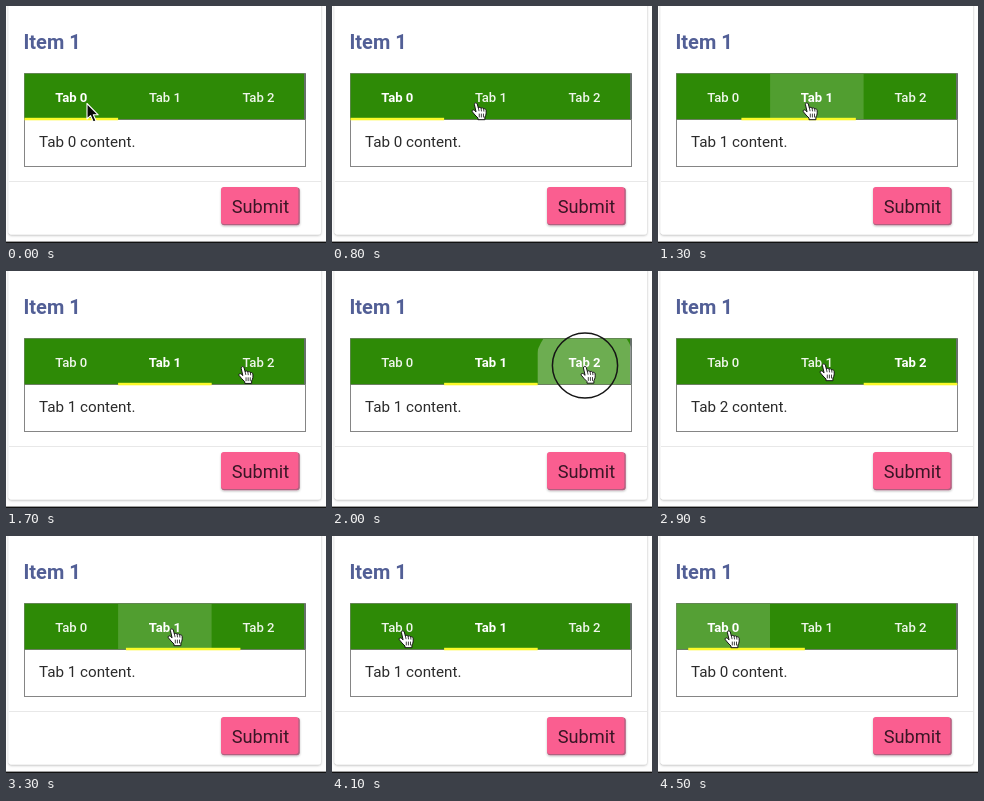
These frames come from a looping animation (320x237 px, 4600 ms). An HTML page:

```html
<!DOCTYPE html>
<html lang="en">
<head>
<meta charset="utf-8">
<title>Tabs</title>
<style>
html, body { margin: 0; width: 100%; height: 100%; overflow: hidden; background: #fdfdfd; }
svg { display: block; width: 100vw; height: 100vh; }
text { font-family: Roboto, "Open Sans", sans-serif; }
.tab { font-size: 13.1px; font-weight: 500; fill: #eef6ea; text-anchor: middle; }
.tab.active { font-weight: 700; fill: #fff; }
</style>
</head>
<body>
<svg viewBox="0 0 320 237">
  <defs>
    <filter id="shadow" x="-10%" y="-10%" width="120%" height="130%">
      <feDropShadow dx="0" dy="1" stdDeviation="1.2" flood-opacity=".27"/>
    </filter>
    <clipPath id="tabClip"><rect id="clipRect" y="68" width="93.5" height="45"/></clipPath>
  </defs>

  <rect width="320" height="237" fill="#fdfdfd"/>
  <rect x="2.5" y="-8" width="312.5" height="236.5" rx="3" fill="#fff" filter="url(#shadow)"/>
  <path d="M3 175.5H315" stroke="#e8e8e8"/>
  <rect y="235.6" width="320" height="2" fill="#111"/>

  <text x="17.5" y="43" font-size="20" font-weight="700" fill="#525f96">Item 1</text>

  <rect x="18.5" y="67.5" width="281" height="93" fill="#fff" stroke="#858585"/>
  <rect x="18.5" y="67.6" width="280" height="45.9" fill="#2e8a06"/>
  <path d="M19 113.5H299" stroke="#6b8060"/>
  <path d="M299 68V113" stroke="#66706a" stroke-width="2"/>
  <g clip-path="url(#tabClip)"><circle id="ripple" fill="#fff"/></g>
  <rect id="ink" y="111.8" height="2.5" fill="#fbf92a"/>
  <g id="tabs"></g>
  <text id="content" x="33" y="141" font-size="15.2" fill="#2b2b2b"></text>

  <rect x="215.2" y="181.4" width="78.6" height="37.8" rx="3" fill="#b0617f" filter="url(#shadow)"/>
  <rect x="215" y="181" width="77.4" height="37" rx="3" fill="#fa5e90"/>
  <text x="225.8" y="207" font-size="18.2" fill="#3a1626">Submit</text>

  <circle id="ring" r="32.6" fill="none" stroke="#151515" stroke-width="1.5"/>
  <path id="arrow" d="M0 .5V16L3.6 12.7L6.3 18.9L9 17.7L6.3 11.8H11.2Z"
        fill="#080808" stroke="#fff" stroke-width="1.1" stroke-linejoin="round"/>
  <g id="hand" stroke="#111" stroke-width="1" stroke-linejoin="round" stroke-linecap="round">
    <path fill="#fff" d="M-1.6 1.2C-1.8-.5 .9-.7 1.3 1L2.4 5C3 3.9 4.9 4.2 5.1 5.3C6 4.4 7.5 4.9 7.7 6C8.8 5.4 10 6.1 10.1 7.3C10.4 10 10.2 12.1 8.9 14V16.7H2V15C.1 13.3-2.1 10.8-3.7 8.7C-4.4 7.2-2.7 6.3-1.5 7.4L-.2 8.6Z"/>
    <path fill="none" stroke-width=".8" d="M2.4 5L3 7.8M5.1 5.3L5.5 8M7.7 6L7.9 8.2M3.3 11V14M5.4 11V14M7.5 11V14"/>
  </g>
</svg>
<script>
const LOOP = 4600, STEP = 100;
const TAB_X = 18.5, TAB_W = 93.6, INK_TIME = 400;
const START = { x: 81, y: 97 };

const visits = [
  { tab: 1, move: 300, arrive: 900, press: 975, x: 149, y: 97 },
  { tab: 2, move: 1400, arrive: 1800, press: 1900, x: 253, y: 95.5 },
  { tab: 1, move: 2400, arrive: 2800, press: 2975, x: 166, y: 93 },
  { tab: 0, move: 3600, arrive: 4000, press: 4200, x: 71, y: 95 }
];

const el = id => document.getElementById(id);
const clamp = v => Math.max(0, Math.min(1, v));
const mix = (a, b, p) => a + (b - a) * p;
const smooth = p => p * p * (3 - 2 * p);
const tabLeft = i => TAB_X + i * TAB_W;

function set(id, attrs) {
  for (const name in attrs) el(id).setAttribute(name, attrs[name]);
}
const show = (id, on) => set(id, { visibility: on ? "visible" : "hidden" });

const tabs = [0, 1, 2].map(i => {
  const label = document.createElementNS("http://www.w3.org/2000/svg", "text");
  label.textContent = "Tab " + i;
  label.setAttribute("x", tabLeft(i) + TAB_W / 2);
  label.setAttribute("y", 96);
  return el("tabs").appendChild(label);
});

function cursorAt(t) {
  let { x, y } = START;
  for (const v of visits) {
    const p = smooth(clamp((t - v.move) / (v.arrive - v.move)));
    x = mix(x, v.x, p);
    y = mix(y, v.y, p);
  }
  return { x, y };
}

// The leading edge of the underline runs ahead of the trailing one.
function inkAt(t) {
  let left = tabLeft(0), right = tabLeft(1), current = 0;
  for (const v of visits) {
    const rest = 1 - clamp((t - v.press - 100) / INK_TIME);
    if (rest === 1) break;
    const lead = 1 - rest ** 3, trail = 1 - rest ** 1.43;
    const forward = v.tab > current;
    left = mix(tabLeft(current), tabLeft(v.tab), forward ? trail : lead);
    right = mix(tabLeft(current + 1), tabLeft(v.tab + 1), forward ? lead : trail);
    current = v.tab;
  }
  return { left, right };
}

function render(t) {
  const pos = cursorAt(t), ink = inkAt(t);
  const pressed = visits.filter(v => t >= v.press).pop();
  const age = pressed ? t - pressed.press : Infinity;
  const chosen = visits.filter(v => t >= v.press + 200).pop();
  const active = chosen ? chosen.tab : 0;

  set("ink", { x: ink.left, width: ink.right - ink.left });
  el("content").textContent = `Tab ${active} content.`;
  tabs.forEach((label, i) => {
    const held = age < 200 && pressed.tab === i;
    label.setAttribute("class", i === active || held ? "tab active" : "tab");
  });

  show("ripple", age < 550);
  if (age < 550) {
    set("clipRect", { x: tabLeft(pressed.tab) });
    set("ripple", {
      cx: pressed.x, cy: pressed.y, r: 18 + age * 0.32,
      "fill-opacity": 0.3 * clamp((550 - age) / 400)
    });
  }

  show("ring", age < 200);
  set("ring", { cx: pos.x, cy: pos.y - 1 });
  for (const id of ["arrow", "hand"]) {
    show(id, (id === "arrow") === (t < 400));
    set(id, { transform: `translate(${pos.x} ${pos.y})` });
  }
}

const began = performance.now();
function tick() {
  const t = (performance.now() - began) % LOOP;
  render(Math.floor(t / STEP) * STEP);
  requestAnimationFrame(tick);
}
tick();
</script>
</body>
</html>
```
